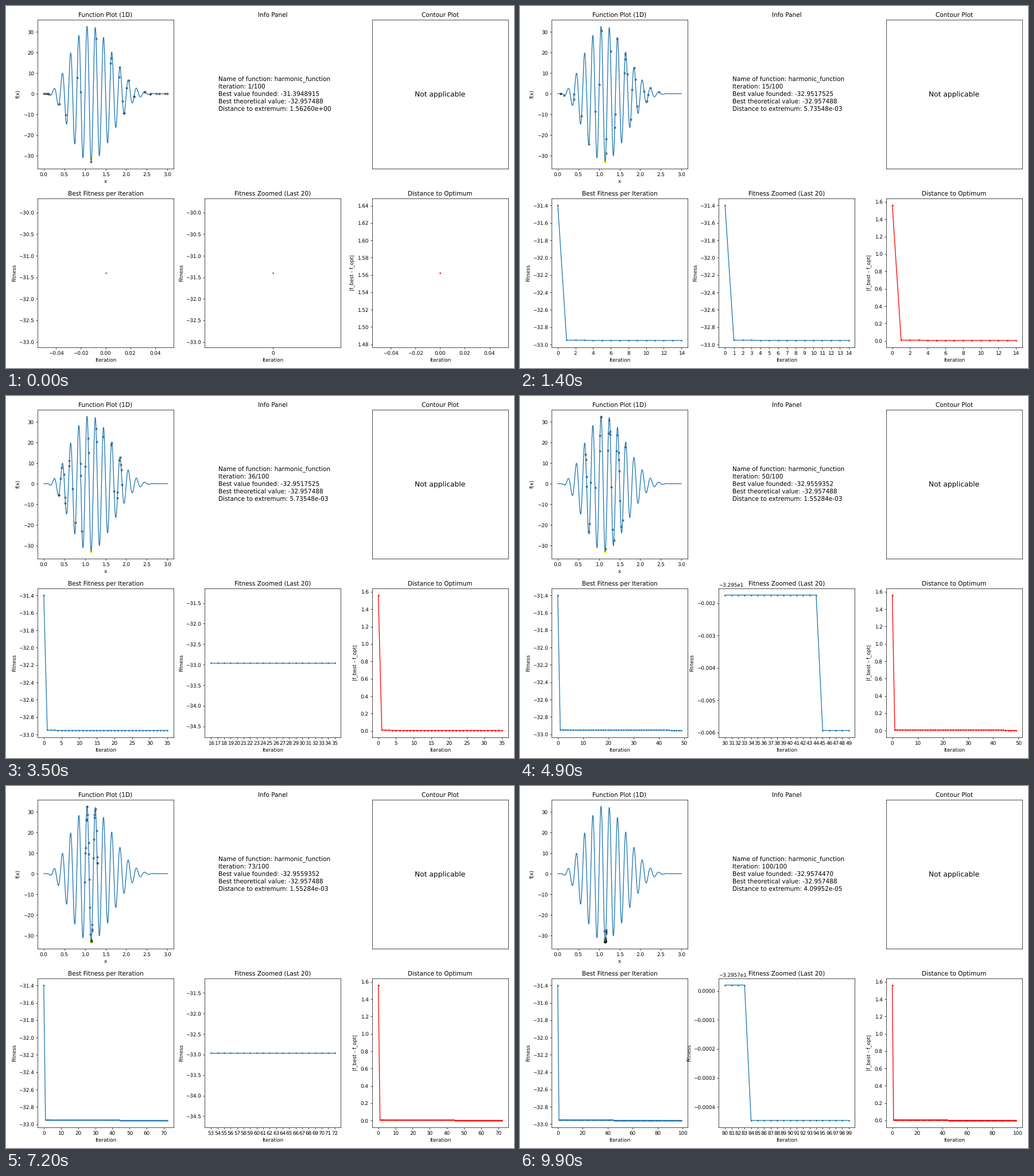
These frames come from a looping animation (885x632 px, 10 s). A matplotlib script:

```python
import numpy as np
import matplotlib.pyplot as plt
from matplotlib.animation import FuncAnimation

DPI, WIDTH, HEIGHT = 63.2, 885, 632
FRAMES, INTERVAL = 100, 100
POP_SIZE, WINDOW = 30, 20
OPTIMUM, X_OPT = -32.957488, 1.15
CURVATURE = -OPTIMUM * (10 * np.pi)**2

# Distance to the optimum reached by the best point, and the iteration it was reached
LEVELS = {0: 1.5625965, 1: .0085, 4: .00573548, 45: .00155284, 75: .0005082, 84: 4.09952e-05}

iterations = np.arange(FRAMES)
starts = np.array(list(LEVELS))
distance = np.array(list(LEVELS.values()))[np.searchsorted(starts, iterations, "right") - 1]
fitness = OPTIMUM + distance
x_best = X_OPT - np.sqrt(2 * distance / CURVATURE)


def harmonic(x):
    return x**3 * (3 - x)**5 * np.sin(10 * np.pi * x)


def population(i):
    """Random points in a range that closes in on the optimum."""
    reach = 1.83 * (1 - i / (FRAMES - 1))**2 + .02
    rng = np.random.default_rng(i)
    return rng.uniform(max(0, X_OPT - reach), X_OPT + reach, POP_SIZE)


def grow(ax, line, x, y):
    line.set_data(x, y)
    ax.relim()
    ax.autoscale_view()


def history(ax, title, ylabel, color):
    ax.set(title=title, xlabel="Iteration", ylabel=ylabel)
    return ax.plot([], [], "o-", color=color, markersize=2)[0]


plt.rcParams["text.hinting"] = "none"
fig, axes = plt.subplots(2, 3, figsize=((WIDTH + 1e-6) / DPI, (HEIGHT + 1e-6) / DPI), dpi=DPI)
fig.subplots_adjust(left=55 / WIDTH, right=874.85 / WIDTH, bottom=36.3 / HEIGHT,
                    top=608.3 / HEIGHT, wspace=54.35 / 237.05, hspace=.2)
(ax_func, ax_info, ax_cont), (ax_fit, ax_zoom, ax_dist) = axes

xs = np.linspace(0, 3, 1000)
ax_func.set(title="Function Plot (1D)", xlabel="x", ylabel="f(x)")
ax_func.plot(xs, harmonic(xs))
ax_func.set(xlim=ax_func.get_xlim(), ylim=ax_func.get_ylim())
best_dot = ax_func.scatter([0], [0], s=22, color="yellow")
dots = ax_func.scatter([0], [0], s=13, color="black", alpha=.5)

ax_info.set_title("Info Panel")
ax_info.axis("off")
info = ax_info.text(.1, .5, "", fontsize=12, va="center", linespacing=1.29,
                    transform=ax_info.transAxes)

ax_cont.set(title="Contour Plot", xticks=[], yticks=[])
ax_cont.text(.5, .5, "Not applicable", fontsize=14, ha="center", va="center",
             transform=ax_cont.transAxes)

fit_line = history(ax_fit, "Best Fitness per Iteration", "Fitness", "tab:blue")
zoom_line = history(ax_zoom, "Fitness Zoomed (Last 20)", "Fitness", "tab:blue")
dist_line = history(ax_dist, "Distance to Optimum", "|f_best - f_opt|", "red")


def update(i):
    x = population(i)
    dots.set_offsets(np.column_stack([x, harmonic(x)]))
    best_dot.set_offsets([[x_best[i], fitness[i]]])
    info.set_text("Name of function: harmonic_function\n"
                  f"Iteration: {i + 1}/{FRAMES}\n"
                  f"Best value founded: {fitness[i]:.7f}\n"
                  f"Best theoretical value: {OPTIMUM:.6f}\n"
                  f"Distance to extremum: {distance[i]:.5e}")

    its = iterations[:i + 1]
    grow(ax_fit, fit_line, its, fitness[its])
    grow(ax_dist, dist_line, its, distance[its])
    last = its[-WINDOW:]
    ax_zoom.set_xticks(last)
    grow(ax_zoom, zoom_line, last, fitness[last])
    return dots, best_dot, info, fit_line, zoom_line, dist_line


anim = FuncAnimation(fig, update, frames=FRAMES, init_func=lambda: update(0),
                     interval=INTERVAL, repeat=True, repeat_delay=0, blit=False)
plt.show()
```
